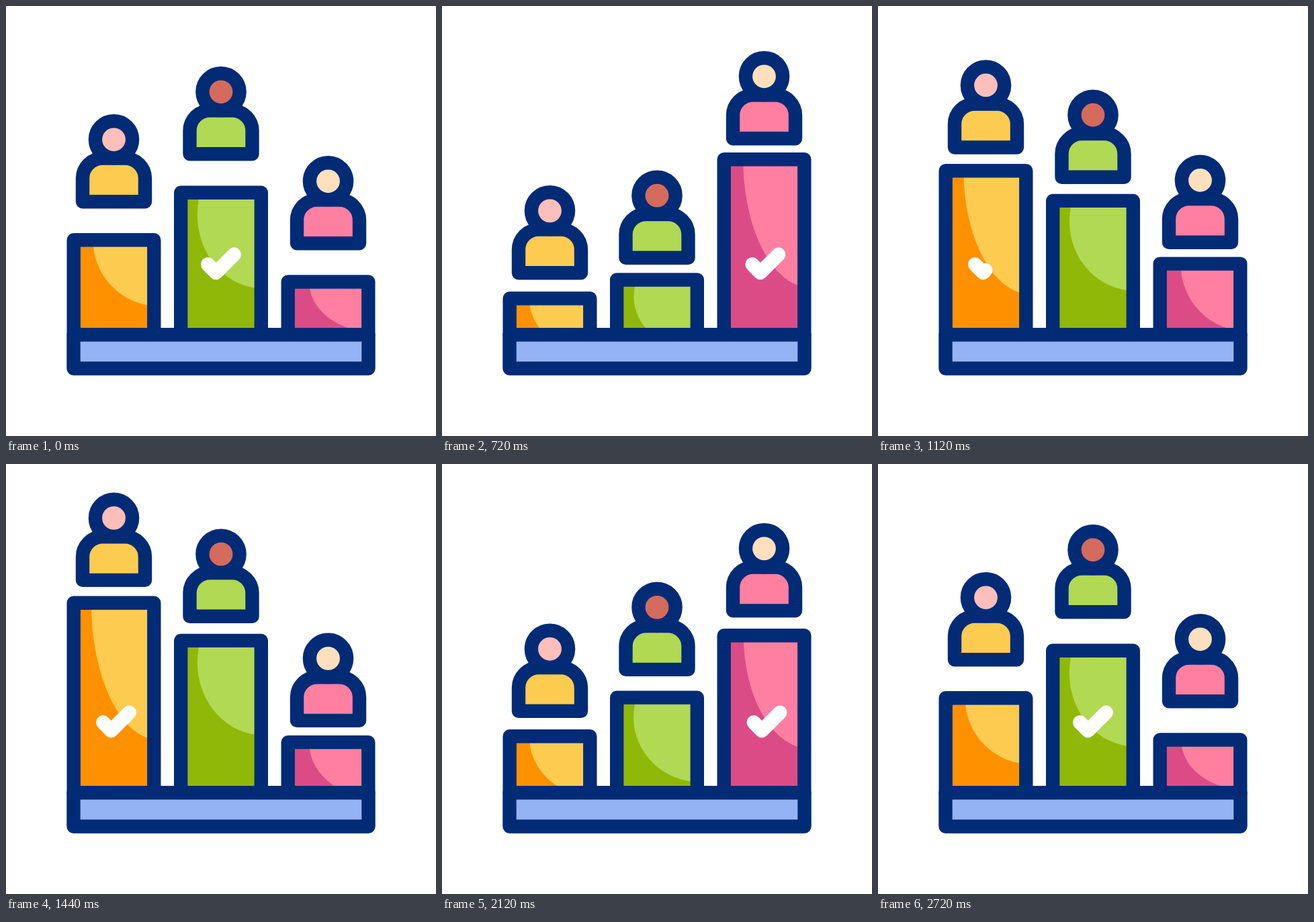
Animation, 640 px wide and 640 px high, one loop 3 s. Source, as an HTML page:

```html
<!DOCTYPE html>
<html lang="en">
<head>
<meta charset="utf-8">
<title>Podium</title>
<style>
  html, body { margin: 0; width: 100%; height: 100%; overflow: hidden; background: #fff; }
  svg { display: block; width: 100vw; height: 100vh; }
  .line { stroke: #022b76; stroke-width: 20.4; stroke-linejoin: round; }
  .check { fill: none; stroke: #fff; stroke-width: 21; stroke-linecap: round; stroke-linejoin: round; }
</style>
</head>
<body>
<svg id="stage" viewBox="0 0 640 640"></svg>
<script>
const LOOP = 3000, STEP = 40;
const KEYS = [0, 680, 1319, 1986, 2690];
const FLOOR = 489.3, BAR_W = 119.6, HALF = 10.2;

// top, head and arc hold one value per key time; the last key returns to the first
const BARS = [
  { x: 100.7, light: '#fdcb50', dark: '#ff9100', skin: '#ffbeb9',
    top: [338, 427.9, 177.2, 401], head: [161, 269.8, 23.3, 245.5],
    arc: [98.5, 81, 214.5, 89.5], arcX: 227, drop: 0,
    check: 144.5, show: [947, 1480] },
  { x: 260.2, light: '#b1d954', dark: '#90b808', skin: '#d46b5d',
    top: [267.5, 399, 243.9, 344.8], head: [90, 246.2, 88, 184.5],
    arc: [109.8, 82, 109.5, 95], arcX: 382.5, drop: 0.3,
    check: 300.5, show: [2307, 0] },
  { x: 419.7, light: '#ff7fa1', dark: '#db4c87', skin: '#ffdfbd',
    top: [400.3, 215.8, 420.6, 228.8], head: [223, 64.7, 268.5, 73.9],
    arc: [75, 192, 73, 178.5], arcX: 548, drop: 0,
    check: 461.8, show: [147, 800], check2: 464, show2: [1627, 2160] }
];

const stage = document.getElementById('stage');

function el(tag, attrs, parent = stage) {
  const node = document.createElementNS('http://www.w3.org/2000/svg', tag);
  set(node, attrs);
  parent.appendChild(node);
  return node;
}

function set(node, attrs) {
  for (const key in attrs) node.setAttribute(key, attrs[key]);
}

function ease(t, start, span) {
  const p = Math.min(1, Math.max(0, (t - start) / span));
  return p * p * (3 - 2 * p);
}

function at(values, t) {
  let i = 0;
  while (i < 3 && t >= KEYS[i + 1]) i++;
  const a = values[i], b = values[(i + 1) % 4];
  return a + (b - a) * ease(t, KEYS[i], KEYS[i + 1] - KEYS[i]);
}

const LEG = Math.hypot(12, 12.2), CHECK_LEN = LEG + Math.hypot(27, 27);

// Part of the tick between the fractions a and b of its length
function tick(x, a, b) {
  if (b - a < 0.002) return '';
  const bend = LEG / CHECK_LEN;
  const point = f => f < bend
    ? [x + 12 * f / bend, 384.6 + 12.2 * f / bend]
    : [x + 12 + 27 * (f - bend) / (1 - bend), 396.8 - 27 * (f - bend) / (1 - bend)];
  const pts = [point(a)];
  if (a < bend && b > bend) pts.push(point(bend));
  pts.push(point(b));
  return 'M' + pts.map(p => p.join(' ')).join('L');
}

function drawTick(node, x, [on, off], t) {
  const grown = ease(t, on, 400), gone = ease(t, off, 400);
  // When it wipes out before it draws in, both parts belong to separate runs
  const d = off < on
    ? (t < on ? tick(x, gone, 1) : tick(x, 0, grown))
    : tick(x, gone, grown);
  node.setAttribute('d', d);
}

const defs = el('defs', {});

BARS.forEach((bar, i) => {
  const clip = el('clipPath', { id: 'bar' + i }, defs);
  bar.mask = el('rect', { x: bar.x, width: BAR_W }, clip);
  const inside = el('g', { 'clip-path': `url(#bar${i})` });
  bar.fill = el('rect', { x: bar.x, width: BAR_W, fill: bar.dark }, inside);
  bar.shine = el('ellipse', { cx: bar.arcX, fill: bar.light }, inside);
  bar.cap = el('rect', { x: bar.x, width: BAR_W, fill: bar.light }, inside);
  bar.tick = el('path', { class: 'check' }, inside);
  if (bar.show2) bar.tick2 = el('path', { class: 'check' }, inside);
  bar.frame = el('rect', { x: bar.x, width: BAR_W, fill: 'none', class: 'line' });

  bar.person = el('g', {});
  el('path', {
    class: 'line', fill: bar.light,
    d: 'M-46.5 130.3V95.6a30 30 0 0 1 30-30h33a30 30 0 0 1 30 30v34.7z'
  }, bar.person);
  el('circle', { class: 'line', fill: bar.skin, cy: 37.8, r: 27.6 }, bar.person);
});

el('rect', { class: 'line', x: 100.5, y: FLOOR, width: 439, height: 50.2, fill: '#94b3f4' });

function draw(t) {
  for (const bar of BARS) {
    const y = at(bar.top, t) + HALF, ry = at(bar.arc, t);
    const box = { y, height: FLOOR - y };
    set(bar.mask, box);
    set(bar.fill, box);
    set(bar.frame, box);
    set(bar.cap, { y, height: 0 });
    set(bar.shine, { cy: y + bar.drop * ry, rx: 95 + ry * 0.025, ry });
    drawTick(bar.tick, bar.check, bar.show, t);
    if (bar.tick2) drawTick(bar.tick2, bar.check2, bar.show2, t);
    set(bar.person, { transform: `translate(${bar.x + BAR_W / 2} ${at(bar.head, t)})` });
  }
}

const begin = performance.now();
function loop(now) {
  const t = Math.max(0, now - begin) % LOOP;
  draw(Math.floor(t / STEP) * STEP);
  requestAnimationFrame(loop);
}
draw(0);
requestAnimationFrame(loop);
</script>
</body>
</html>
```
